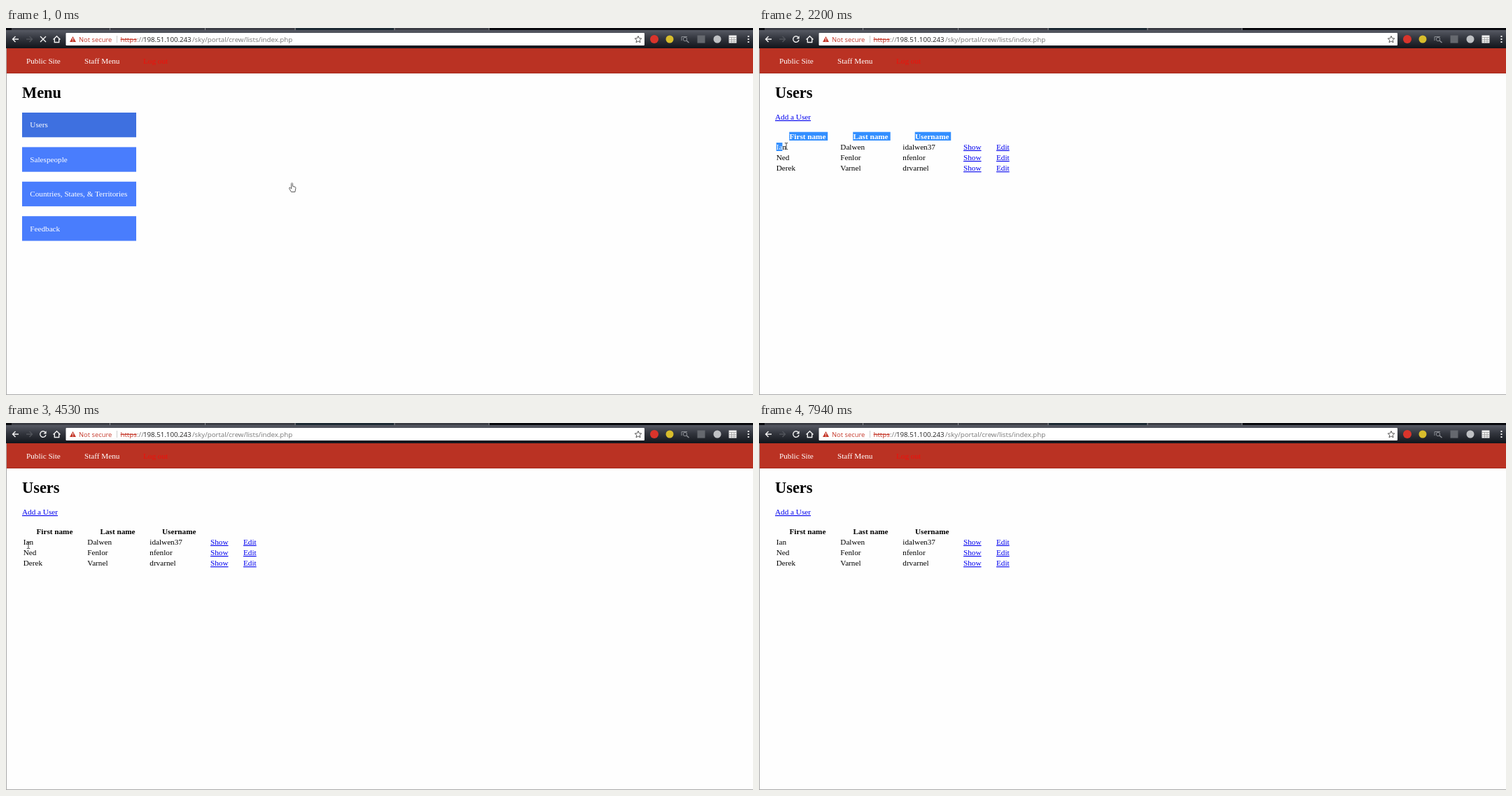
These frames come from a looping animation (1067x525 px, 8000 ms). An HTML page:

```html
<!DOCTYPE html>
<html lang="en">
<head>
<meta charset="utf-8">
<title>Users</title>
<style>
  html, body { margin: 0; width: 100%; height: 100%; overflow: hidden; background: #fefefe; }
  svg { display: block; width: 1067px; height: 525px; }
  text { white-space: pre; }
  .page text { font: 11.2px "Liberation Serif", "Times New Roman", serif; }
  .page .title { font-size: 22.4px; font-weight: bold; }
  .page .head { font-weight: bold; }
  .nav { fill: #fff; }
  .link { fill: #00e; text-decoration: underline; }
  .bar text { font: 9.7px "Open Sans", "Noto Sans", sans-serif; }
  .line { fill: none; stroke: #f2f2f2; stroke-width: 1.4; }
  .pick { fill: #338fff; }
  .pointer { fill: #fff; stroke: #333; stroke-width: .8; stroke-linejoin: round; }
</style>
</head>
<body>
<svg viewBox="0 0 1067 525">
  <defs>
    <linearGradient id="chrome" x2="0" y2="1">
      <stop offset="0" stop-color="#575a64"/>
      <stop offset=".45" stop-color="#33363e"/>
      <stop offset="1" stop-color="#12151b"/>
    </linearGradient>
  </defs>

  <rect width="1067" height="525" fill="#fefefe"/>

  <g class="bar">
    <rect width="1067" height="4" fill="#08090d"/>
    <path d="M8 0H690V3H8z" fill="#3a3c43"/>
    <path d="M414 0H554V3H414z" fill="#1d2a33"/>
    <path d="M148.5 0V3M284.5 0V3M413 0V3M555 0V3M690 0V3" stroke="#8a8c92"/>
    <rect y="3" width="1067" height="26" fill="url(#chrome)"/>
    <path class="line" d="M18 16H9.5M13.5 12L9.5 16L13.5 20"/>
    <path class="line" style="stroke:#51545b" d="M29 16H37.5M33.5 12L37.5 16L33.5 20"/>
    <path class="line" id="stop" d="M49 12L57 20M57 12L49 20"/>
    <g id="reload">
      <path class="line" d="M56.2 13.4A4.2 4.2 0 1 0 57 17"/>
      <path d="M57.6 11.2V15.4H53.4z" fill="#f2f2f2"/>
    </g>
    <path class="line" d="M67.5 16.5L72.5 11.8L77.5 16.5M69.3 15.5V20.5H75.7V15.5"/>

    <rect x="85.500" y="7" width="826.500" height="18" rx="1" fill="#fff"/>
    <path d="M95.500 12L100 20H91z" fill="#c5392b"/>
    <path d="M95.500 14.500V17M95.500 18V19" stroke="#fff"/>
    <text x="104" y="19.700" fill="#c5392b" style="font-size:9.400px">Not secure</text>
    <path d="M158.500 11V21" stroke="#ccc"/>
    <text x="163.500" y="19.700" fill="#c5392b" style="text-decoration:line-through">https</text>
    <text x="187" y="19.700" fill="#777">://</text>
    <text x="196" y="19.700" fill="#222">198.51.100.243</text>
    <text x="266" y="19.700" fill="#777">/sky/portal/crew/lists/index.php</text>
    <path d="M903 11.500L904.400 14.700L907.800 15L905.200 17.300L906 20.700L903 18.900L900 20.700L900.800 17.300L898.200 15L901.600 14.700z"
      fill="none" stroke="#555"/>

    <circle cx="926" cy="16" r="6" fill="#d9342b"/>
    <circle cx="948" cy="16" r="5.500" fill="#d8bd2c"/>
    <g fill="none" stroke="#8b8e94">
      <path d="M965 18V12.500H973"/>
      <circle cx="970" cy="16" r="2.700"/>
      <path d="M972 18L975.500 21" stroke-width="1.600"/>
    </g>
    <rect x="987.500" y="10.500" width="11" height="11" fill="#65686e"/>
    <circle cx="1016" cy="16" r="5.500" fill="#bfc1c4"/>
    <rect x="1032.500" y="10.500" width="11" height="11" fill="#f1f1f1"/>
    <path d="M1033 13.500H1043M1033 16.500H1043M1033 19H1043M1036.500 13V21M1040 13V21" stroke="#999" stroke-width=".7"/>
    <path d="M1059.500 11h2v2h-2zM1059.500 15h2v2h-2zM1059.500 19h2v2h-2z" fill="#f2f2f2"/>
  </g>

  <g class="page">
    <rect y="29" width="1067" height="35.500" fill="#ba3223"/>
    <path d="M0 64.500H1067" stroke="#a52a1e"/>
    <text class="nav" x="29" y="51.300">Public Site</text>
    <text class="nav" x="112" y="51.300">Staff Menu</text>
    <text x="196" y="51.300" fill="#f00f0a">Log out</text>
    <g id="menu"><text class="title" x="23" y="100">Menu</text></g>
    <g id="users">
      <text class="title" x="23" y="100">Users</text>
      <text class="link" x="23" y="131">Add a User</text>
      <g id="heads"></g>
      <rect class="pick" id="mark" x="24.700" y="164" height="12"/>
      <g id="rows"></g>
    </g>
  </g>
  <path d="M.5 29V525M0 524.500H1067" stroke="#a9a9a9" fill="none"/>

  <g id="hand" class="pointer">
    <path d="M-1.500 2V-5.500Q-.5 -7.500 .5 -5.500V-1.500L4 -.7Q5 0 4.800 1.500L3.800 6.500H-1.500L-4.500 1.500Q-4.500 -.5 -3 .5z"/>
  </g>
  <g id="arrow" class="pointer">
    <path d="M.4 .4V9.300L2.400 7.500L3.800 10.700L5.200 10.100L3.800 7H6.300z"/>
  </g>
  <g id="beam" fill="none" stroke="#333" stroke-width=".9">
    <path d="M-2.200 -4.500H-.7L0 -4L.7 -4.500H2.200M0 -4V4M-2.200 4.500H-.7L0 4L.7 4.500H2.200"/>
  </g>
</svg>

<script>
const LOOP = 8000;
const $ = id => document.getElementById(id);

function add(parent, tag, attrs, label = '') {
  const el = document.createElementNS('http://www.w3.org/2000/svg', tag);
  for (const key in attrs) el.setAttribute(key, attrs[key]);
  el.textContent = label;
  return parent.appendChild(el);
}

['Users', 'Salespeople', 'Countries, States, & Territories', 'Feedback'].forEach((label, i) => {
  const y = 121 + i * 49.4;
  add($('menu'), 'rect', { x: 23, y, width: 163, height: 35.3, fill: i ? '#497dfd' : '#3e70e0' });
  add($('menu'), 'text', { class: 'nav', x: 34.3, y: y + 21.4 }, label);
});

const heads = [['First name', 43.5, 55], ['Last name', 134.5, 53.5], ['Username', 223, 51.5]].map(([label, x, width]) => ({
  box: add($('heads'), 'rect', { class: 'pick', x: x - .3, y: 148.7, width, height: 12.3 }),
  label: add($('heads'), 'text', { class: 'head', x, y: 158.5 }, label)
}));

const columns = [24.7, 116.3, 205.3, 292, 339];
[['Ian', 'Dalwen', 'idalwen37'], ['Ned', 'Fenlor', 'nfenlor'], ['Derek', 'Varnel', 'drvarnel']].forEach((row, r) =>
  [...row, 'Show', 'Edit'].forEach((label, c) =>
    add($('rows'), 'text', { class: c > 2 ? 'link' : '', x: columns[c], y: 173.8 + r * 15.2 }, label)));

// The first cell is split by letter so that part of it can be selected.
const cell = $('rows').firstChild;
const name = cell.textContent;
cell.textContent = '';
const letters = [...name].map(ch => add(cell, 'tspan', {}, ch));

// Bursts of movement: start, end, number of steps.
const bursts = [
  [120, 1080, 8], [1200, 2200, 8], [2330, 3350, 9], [3500, 4160, 6], [4530, 4920, 4],
  [5200, 5350, 2], [5910, 6480, 5], [6850, 7820, 8], [7940, 7940, 1]
];

// Pointer path: time, x, y, and the shape used from then on.
const path = [
  [0, 409, 228, 'hand'], [120, 415, 222], [386, 434.5, 191, 'arrow'], [800, 290, 190],
  [1080, 150, 178, 'beam'], [1300, 90, 182, 'arrow'], [1630, 2, 178], [1900, 18, 154, 'beam'],
  [2200, 39, 169], [2580, 70, 175], [2970, 28, 184], [3350, 48, 188],
  [3500, 52.3, 208.5], [3632, 57, 241], [3896, 45, 210], [4160, 29, 173],
  [4530, 32, 175], [4920, 41, 172], [5200, 88, 190], [5350, 124, 199],
  [5910, 165, 222, 'arrow'], [6337, 350, 342], [6480, 374, 338], [6850, 388, 339],
  [7127, 406.5, 341], [7404, 510, 402], [7680, 600, 429], [7820, 617, 413]
];

function snap(t) {
  let time = 0;
  for (const [start, end, count] of bursts) {
    if (t < start) break;
    const step = (end - start) / (count - 1 || 1);
    time = step ? start + step * Math.min(count - 1, Math.floor((t - start + 8) / step)) : start;
  }
  return time;
}

function pointerAt(t) {
  let i = 0, shape;
  while (i < path.length && path[i][0] <= t + .5) shape = path[i++][3] || shape;
  const a = path[i - 1], b = path[i] || a;
  const k = b === a ? 0 : Math.max(0, (t - a[0]) / (b[0] - a[0]));
  return { shape, x: a[1] + (b[1] - a[1]) * k, y: a[2] + (b[2] - a[2]) * k };
}

function pickedLetters(t) {
  if (t >= 2050 && t < 3500) return t < 2192 ? 1 : t < 2330 ? 2 : 3;
  if (t >= 4530 && t < 5630) return Math.min(3, Math.floor((t - 4522) / 130));
  return 0;
}

const show = (el, on) => el.setAttribute('visibility', on ? 'visible' : 'hidden');

function draw(t) {
  const listed = t >= 386;
  $('menu').style.display = listed ? 'none' : '';
  $('users').style.display = listed ? '' : 'none';
  show($('stop'), t < 800);
  show($('reload'), t >= 800);

  const wide = t >= 1906 && t < 3500;
  for (const { box, label } of heads) {
    show(box, wide);
    label.setAttribute('fill', wide ? '#fff' : '#000');
  }

  const count = pickedLetters(t);
  $('mark').setAttribute('width', listed && count ? cell.getSubStringLength(0, count) : 0);
  letters.forEach((el, i) => el.setAttribute('fill', i < count ? '#fff' : '#000'));

  const { shape, x, y } = pointerAt(snap(t));
  for (const id of ['hand', 'arrow', 'beam']) {
    show($(id), id === shape && t < 7940);
    $(id).setAttribute('transform', `translate(${x.toFixed(1)} ${y.toFixed(1)})`);
  }
}

const begin = performance.now();
function tick() {
  draw((performance.now() - begin) % LOOP);
  requestAnimationFrame(tick);
}
tick();
</script>
</body>
</html>
```
